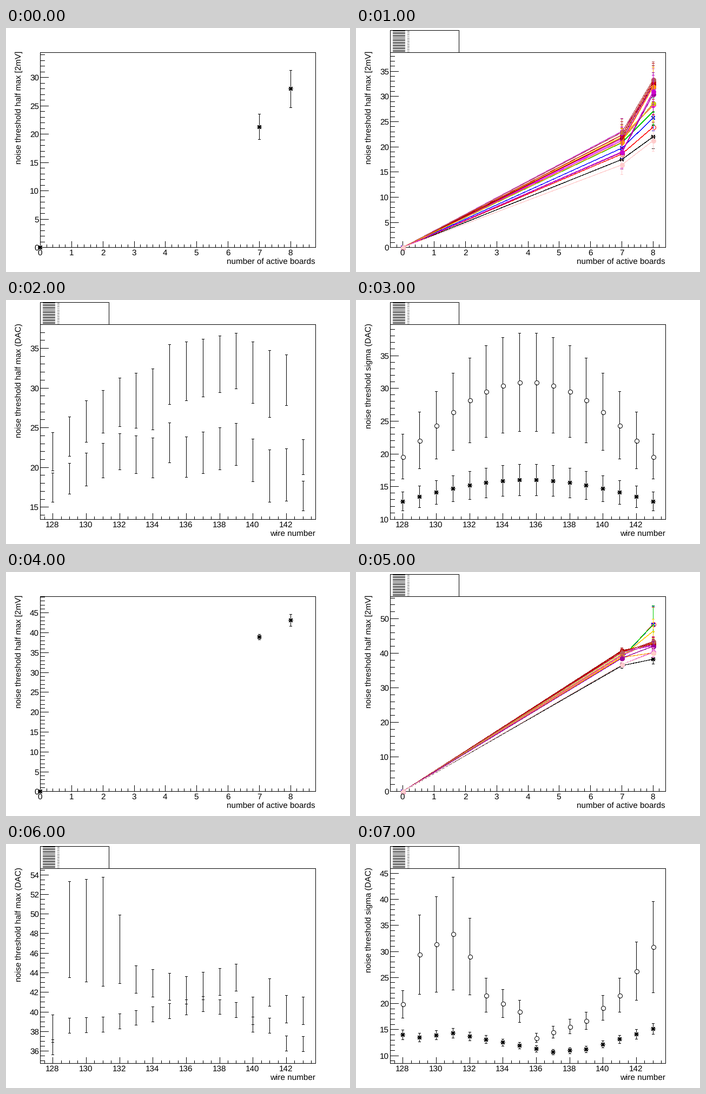
A matplotlib script for the animation above (8 s loop, 636 by 452 pixels).

```python
import math

import matplotlib.pyplot as plt
import numpy as np
from matplotlib.animation import FuncAnimation

W, H, DPI = 636, 452, 64
PT = 72 / DPI  # points per pixel
X0, X1, Y0, Y1 = 0.1 * W, 0.9 * W, 0.9 * H, 0.1 * H  # plot area
LEFT, RIGHT, BOTTOM, TOP = (int(v) for v in (X0, X1, Y0, Y1))

plt.rcParams["font.family"] = "Liberation Sans"
plt.rcParams["text.hinting"] = "none"
fig = plt.figure(figsize=(W / DPI, H / DPI), dpi=DPI, facecolor="white")
ax = fig.add_axes([0, 0, 1, 1])

WIRES = np.arange(128, 144)
N = np.arange(16)
COLORS = ["#000000", "#ff0000", "#0000ff", "#00cc00", "#ffcc00", "#ff00ff",
          "#cccc00", "#cc33cc", "#cc00cc", "#990000", "#cc0000", "#b85c5c",
          "#ff9900", "#990099", "#cc00cc", "#ffcccc"]
MARKERS = "*Ox.." + "o" * 11  # O is an open circle


def curve(at, values):
    """Value for every wire, linear between key points."""
    return np.interp(N, at, values)


# first run: (centre, error) with 7 and 8 boards
half_a7 = (curve([0, 4, 6, 7, 8, 11, 13, 14, 15],
                 [17.45, 22, 21.2, 23.1, 21.3, 22.9, 18.9, 19.05, 16.4]),
           curve([0, 6, 12, 13, 14, 15], [1.85, 2.5, 2.7, 3.3, 3.3, 1.85]))
half_a8 = (curve([0, 2, 4, 6, 7, 11, 13, 14, 15],
                 [22, 25.8, 28.2, 28.6, 31.7, 33.4, 30.5, 31, 21.3]),
           curve([0, 3, 6, 11, 13, 15], [2.4, 2.7, 3.85, 3.5, 4.2, 2.2]))
bump = np.sin(np.pi * (N + 1) / 17)
sigma_a7 = (12 + 4 * bump, 1.2 + 1.2 * bump)
sigma_a8 = (17 + 14 * bump, 2.5 + 5 * bump)

# second run
half_b7 = (curve([0, 1, 3, 9, 11, 12, 13, 14, 15],
                 [36.4, 38.6, 38.7, 40.8, 40.2, 38.7, 38.6, 36.8, 36.7]),
           np.full(16, 0.77))
half_b8 = (curve([0, 1, 3, 4, 5, 8, 11, 12, 13, 14, 15],
                 [38.3, 48.4, 48.2, 46.4, 43.3, 42.2, 43.5, 40.1, 42, 40.3, 40.1]),
           curve([0, 1, 3, 5], [1.4, 4.9, 5.55, 1.4]))
sigma7 = curve([0, 1, 3, 9, 11, 15], [14, 13.5, 14.3, 10.7, 11.2, 15.1])
sigma8 = curve([0, 1, 3, 4, 5, 7, 8, 11, 13, 15],
               [19.9, 29.4, 33.4, 29, 21.6, 18.5, 13.4, 16.7, 21.6, 30.85])
sigma_b7 = sigma7, 1.03 * (sigma7 / 15) ** 2
sigma_b8 = sigma8, 10.85 * (sigma8 / 33.4) ** 2.73


def line(xs, ys, color="black"):
    """Crisp one-pixel line along the axes."""
    ax.plot(xs, ys, color=color, lw=PT, antialiased=False, snap=True,
            solid_capstyle="butt")


def slant(xs, ys, color="black"):
    """Crisp sloping line; a hairline touches one pixel per step."""
    ax.plot(np.add(xs, .5), np.add(ys, .5), color=color, lw=0.1 * PT,
            antialiased=False, snap=False, solid_capstyle="butt")


def text(x, y, s, **kw):
    ax.text(x, y, s, fontsize=15.2 * PT, va="baseline", **kw)


def tick_steps(lo, hi):
    """Major step of at most ten divisions, minor step of at most five."""
    def round_up(v):
        base = 10 ** math.floor(math.log10(v))
        return next(m * base for m in (1, 2, 5, 10) if v <= m * base * 1.0001)
    major = round_up((hi - lo) / 10)
    return major, round_up(major / 5)


def ticks(lo, hi):
    major, minor = tick_steps(lo, hi)
    n = round(major / minor)
    for k in range(math.ceil(lo / minor - 1e-6), math.floor(hi / minor + 1e-6) + 1):
        yield k * minor, k % n == 0


class Frame:
    """Axis frame that maps data to pixels."""

    def __init__(self, xlim, ylim, xtitle, ytitle):
        self.xlim, self.ylim = xlim, ylim
        line([LEFT, RIGHT, RIGHT, LEFT, LEFT], [TOP, TOP, BOTTOM, BOTTOM, TOP])
        for v, major in ticks(*xlim):
            x = self.px(v)
            line([x, x], [BOTTOM, BOTTOM - (11 if major else 5)])
            if major:
                text(x, 421, f"{v:.0f}", ha="center")
        for v, major in ticks(*ylim):
            y = self.py(v)
            line([LEFT, LEFT + (15 if major else 8)], [y, y])
            if major:
                text(61, y + 6, f"{v:.0f}", ha="right")
        text(RIGHT, 438, xtitle, ha="right")
        text(28, 43, ytitle, ha="right", rotation=90, rotation_mode="anchor")

    def px(self, v):
        lo, hi = self.xlim
        return int(X0 + (v - lo) / (hi - lo) * (X1 - X0) + 1e-4)

    def py(self, v):
        lo, hi = self.ylim
        return int(Y0 + (v - lo) / (hi - lo) * (Y1 - Y0) + 1e-4)

    def bar(self, x, y, err, color="black", gap=4):
        cx, cy = self.px(x), self.py(y)
        for end, side in ((self.py(y + err), -1), (self.py(y - err), 1)):
            if (end - cy) * side > gap:
                line([cx, cx], [cy + side * gap, end], color)
                line([cx - 2, cx + 2], [end, end], color)

    def mark(self, x, y, kind="*", color="black"):
        cx, cy = self.px(x), self.py(y)
        if kind in "*x":
            for d in (3, -3):
                slant([cx - 3, cx + 3], [cy - d, cy + d], color)
            if kind == "*":
                line([cx - 4, cx + 4], [cy, cy], color)
                line([cx, cx], [cy - 4, cy + 4], color)
        else:
            ax.plot([cx + .5], [cy + .5], marker="o", mec=color, mew=PT, ls="none",
                    ms=(2 if kind == "." else 8) * PT,
                    mfc="none" if kind == "O" else color)


def legend():
    line([LEFT, 190, 190, LEFT, LEFT], [4, 4, TOP, TOP, 4])
    for i, wire in enumerate(WIRES):
        y = 5.22 + 2.55 * i
        line([68, 90], [round(y), round(y)])
        ax.text(95, y + 1.5, str(wire), fontsize=3 * PT, color="#555555")


def single(y7, e7, y8, e8):
    """One wire against the number of boards."""
    f = Frame((0, 8.8), (0, 1.1 * (y8 + e8)),
              "number of active boards", "noise threshold half max [2mV]")
    for x, y, e in ((0, 0, 0), (7, y7, e7), (8, y8, e8)):
        f.bar(x, y, e)
        f.mark(x, y)


def all_wires(seven, eight):
    """Every wire against the number of boards."""
    f = Frame((-0.4, 8.4), (0, 1.05 * max(eight[0] + eight[1])),
              "number of active boards", "noise threshold half max [2mV]")
    for i, (color, kind) in enumerate(zip(COLORS, MARKERS)):
        pts = [(0, 0, 0), (7, seven[0][i], seven[1][i]), (8, eight[0][i], eight[1][i])]
        for x, y, e in pts:
            f.bar(x, y, e, color)
        slant([f.px(p[0]) for p in pts], [f.py(p[1]) for p in pts], color)
        for x, y, _ in pts:
            f.mark(x, y, kind, color)
    legend()


def by_wire(seven, eight, name, marked):
    """Both board counts against the wire number."""
    low = min(min(y - e) for y, e in (seven, eight))
    high = max(max(y + e) for y, e in (seven, eight))
    pad = 0.05 * (high - low)
    f = Frame((127.25, 143.75), (low - pad, high + pad),
              "wire number", f"noise threshold {name} (DAC)")
    for (ys, errs), kind in ((seven, "*"), (eight, "O")):
        for x, y, e in zip(WIRES, ys, errs):
            f.bar(x, y, e, gap=4 if marked else 0)
            if marked:
                f.mark(x, y, kind)
    legend()


SCENES = [
    lambda: single(21.3, 2.2, 28, 3.3),
    lambda: all_wires(half_a7, half_a8),
    lambda: by_wire(half_a7, half_a8, "half max", False),
    lambda: by_wire(sigma_a7, sigma_a8, "sigma", True),
    lambda: single(38.95, 0.7, 43.2, 1.5),
    lambda: all_wires(half_b7, half_b8),
    lambda: by_wire(half_b7, half_b8, "half max", False),
    lambda: by_wire(sigma_b7, sigma_b8, "sigma", True),
]


def draw(i):
    ax.clear()
    ax.set_axis_off()
    SCENES[i]()
    ax.set_xlim(0, W)
    ax.set_ylim(H, 0)
    return []


anim = FuncAnimation(fig, draw, frames=len(SCENES), interval=1000, repeat=True)
plt.show()
```
